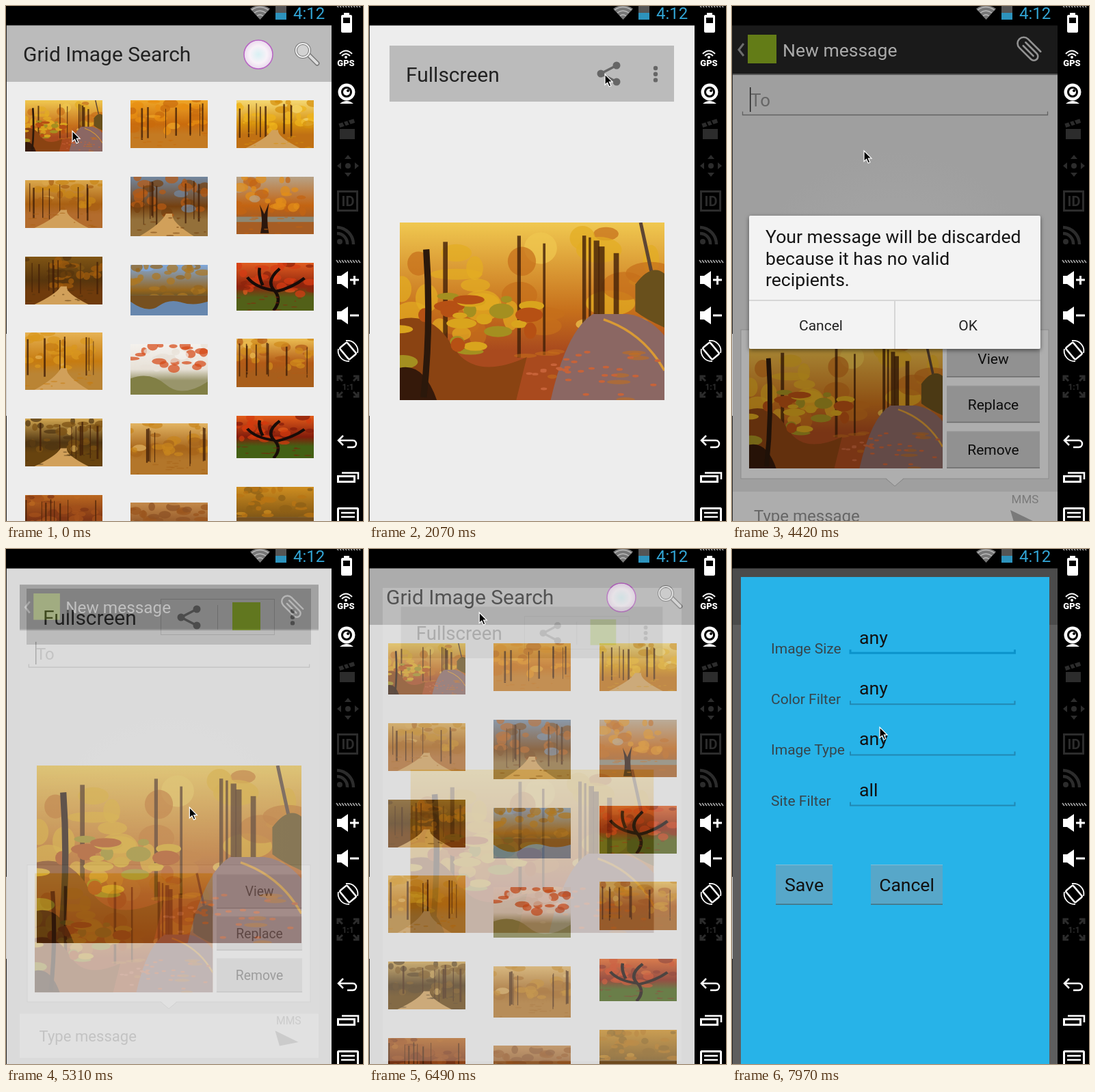
Recreate the animation shown at these times as an HTML page. Size 522 px wide and 754 px high, loop 8000 ms.

```html
<!DOCTYPE html>
<html lang="en">
<head>
<meta charset="utf-8">
<title>Grid Image Search</title>
<style>
html, body { margin: 0; width: 100%; height: 100%; overflow: hidden; background: #000; }
svg { display: block; }
#stage { width: 522px; height: 754px; font-family: Roboto, "Open Sans", sans-serif; }
</style>
</head>
<body>
<svg id="stage" viewBox="0 0 522 754"></svg>
<script>
const rect = (x, y, w, h, fill, extra = '') => `<rect x="${x}" y="${y}" width="${w}" height="${h}" fill="${fill}" ${extra}/>`;
const circle = (x, y, r, fill, extra = '') => `<circle cx="${x}" cy="${y}" r="${r}" fill="${fill}" ${extra}/>`;
const shape = (d, fill) => `<path d="${d}" fill="${fill}"/>`;
const line = (d, color, width = 2, extra = '') => `<path d="${d}" fill="none" stroke="${color}" stroke-width="${width}" ${extra}/>`;
const text = (x, y, size, fill, label, extra = '') => `<text x="${x}" y="${y}" font-size="${size}" fill="${fill}" ${extra}>${label}</text>`;
const middle = 'text-anchor="middle"';
const round = 'stroke-linecap="round" stroke-linejoin="round"';
const repeat = (n, make) => Array.from({ length: n }, (_, i) => make(i)).join('');

function random(seed) {
  return () => (seed = seed * 16807 % 2147483647) / 2147483647;
}

// Soft autumn scenery, painted in a 100 x 66 box.
let photoCount = 0;
const features = {
  road: () => shape('M73 34Q63 40 57 66H100V42Q94 35 86 34Z', '#8b6763') + line('M77 36Q92 41 100 55', '#d99a35', .9),
  path: () => shape('M46 41H54Q52 50 82 66H12Q40 52 46 41Z', '#d1a05a'),
  wood: () => '',
  lake: () => rect(0, 40, 100, 26, '#6787ae') + shape('M0 40H100V48Q82 54 66 49T36 54T0 48Z', '#765020'),
  tree: () => rect(0, 46, 100, 6, '#8d8875') + shape('M31 65Q35 50 30 32L36 43L42 30Q38 50 42 65Z', '#2b170d'),
  maple: () => line('M48 66Q60 50 48 37Q38 24 56 8M48 38Q24 34 14 20M50 40Q73 34 88 21M34 31Q28 18 30 7', '#180c08', 4),
  leaves: () => shape('M0 45Q25 35 46 53T100 49V66H0Z', '#817f45')
};

function photo(x, y, w, h, kind, sky, leafA, leafB, ground, seed) {
  const next = random(seed * 7919 + 11), id = 'tone' + photoCount++;
  const spread = kind === 'leaves' ? 34 : 43;
  const dabs = repeat(30, i => {
    const color = [leafA, leafB, i % 4 ? leafA : sky][i % 3];
    const cx = next() * 100, cy = next() * spread, rx = 3 + next() * 7, ry = 2 + next() * 4;
    return `<ellipse cx="${cx}" cy="${cy}" rx="${rx}" ry="${ry}" fill="${color}" opacity=".72"/>`;
  });
  const stems = 'road path wood'.includes(kind)
    ? repeat(8, () => rect(next() * 96, 4 + next() * 8, .7 + next() * 1.8, 38 + next() * 8, '#432008', 'opacity=".8"')) : '';
  const litter = kind === 'lake' || kind === 'leaves' ? '' : repeat(14, () =>
    `<ellipse cx="${next() * 100}" cy="${45 + next() * 21}" rx="${1 + next() * 4}" ry=".8" fill="${leafB}" opacity=".55"/>`);
  return `<svg x="${x}" y="${y}" width="${w}" height="${h}" viewBox="0 0 100 66" preserveAspectRatio="none">
    <linearGradient id="${id}" x2="0" y2="1"><stop stop-color="${sky}"/><stop offset=".5" stop-color="${leafB}"/>
    <stop offset=".72" stop-color="${ground}"/><stop offset="1" stop-color="${ground}"/></linearGradient>
    ${rect(0, 0, 100, 66, `url(#${id})`)}${dabs}${stems}${features[kind]()}${litter}</svg>`;
}

function roadPhoto(x, y, w, h) {
  const next = random(42);
  return photo(x, y, w, h, 'road', '#f0c850', '#e3ad22', '#c66f1b', '#a94a1e', 5).replace('</svg>',
    shape('M0 36Q12 33 20 46T48 50L44 66H0Z', '#8a4312') +
    repeat(24, i => `<ellipse cx="${next() * 50}" cy="${26 + next() * 26}" rx="${2 + next() * 4}" ry="${1 + next() * 2}" fill="${['#d9a41d', '#b65014', '#a48f20'][i % 3]}"/>`) +
    shape('M0 66V54Q9 52 14 66Z', '#35190a') +
    line('M10 10Q12 38 9 65', '#2b180b', 2.4) + line('M91 0L95 18', '#5d4533', 1.3) +
    shape('M89 23Q95 15 100 19V39Q93 36 89 33Z', '#69501c') +
    repeat(30, () => `<ellipse cx="${48 + next() * 50}" cy="${48 + next() * 17}" rx="1.2" ry=".5" fill="#c76339"/>`) + '</svg>');
}

const thumbs = [
  [1, 138, 70, 'wood', '#efa627', '#e88e10', '#c96b0d', '#c47a22'],
  [2, 138, 70, 'path', '#f5d873', '#efb41c', '#d6900e', '#c07013'],
  [0, 255, 70, 'path', '#dba84c', '#c78518', '#a96013', '#b36c2d'],
  [1, 250, 87, 'path', '#72879f', '#b75a13', '#75400f', '#94703a'],
  [2, 250, 84, 'tree', '#b7a287', '#e28d19', '#c36412', '#a65d24'],
  [0, 367, 70, 'path', '#805514', '#a15c0d', '#57350d', '#6f3b0c'],
  [1, 379, 74, 'lake', '#7fa8dc', '#ad7721', '#96651c', '#4c4930'],
  [2, 376, 70, 'maple', '#e05c20', '#d53b13', '#8d240d', '#526018'],
  [0, 478, 84, 'path', '#e6b253', '#d9971d', '#c67b10', '#ba8434'],
  [1, 495, 74, 'leaves', '#f4f1ed', '#d64a16', '#e7e1d7', '#99956b'],
  [2, 487, 71, 'wood', '#ebbd51', '#d08a1c', '#b35b17', '#a85e1b'],
  [0, 604, 70, 'path', '#d2a650', '#7c5014', '#4f3512', '#67430f'],
  [1, 611, 75, 'wood', '#e2b463', '#c7851d', '#a7651a', '#b3762a'],
  [2, 600, 62, 'maple', '#e35c1a', '#d23a0e', '#831c0b', '#436014'],
  [0, 716, 70, 'path', '#bb6820', '#a4511b', '#803615', '#552f1c'],
  [1, 727, 70, 'leaves', '#c3894a', '#9a541d', '#8c5124', '#5d3b27'],
  [2, 704, 74, 'lake', '#cf8e20', '#ba7514', '#8e5f16', '#704f19']
];

const share = (x, y) => line(`M${x + 12} ${y - 12}L${x - 11} ${y}L${x + 12} ${y + 12}`, '#666', 3.5) +
  circle(x - 11, y, 5.5, '#666') + circle(x + 12, y - 12, 5.5, '#666') + circle(x + 12, y + 12, 5.5, '#666');
const field = (x, y, w, color, width) => line(`M${x} ${y - 5}V${y}H${x + w}V${y - 5}`, color, width);

function button(x, y, w, h, label, size, fill, edge) {
  return rect(x, y, w, h, fill) + rect(x, y, w, 1, '#fff', 'opacity=".25"') + rect(x, y + h - 1.5, w, 1.5, edge) +
    text(x + w / 2, y + h / 2 + size * .36, size, '#111', label, middle);
}

const grid = rect(1, 28, 475, 753, '#ededed') + rect(1, 29, 475, 82, '#bbb') +
  text(25, 81, 30, '#222', 'Grid Image Search') +
  circle(369, 71, 21, 'url(#pearl)', 'stroke="#b863c4" stroke-width="1.5"') +
  line('M443 72L455 84', '#777', 7, round) + line('M443 72L455 84', '#ddd', 4, round) +
  circle(434, 65, 10, '#d2d2d2', 'stroke="#777" stroke-width="4"') + circle(434, 65, 10, 'none', 'stroke="#eee" stroke-width="2"') +
  roadPhoto(28, 138, 113, 75) +
  thumbs.map(([col, y, h, ...look], i) => photo([28, 182, 337][col], y, 113, h, ...look, i + 21)).join('');

const full = rect(1, 28, 475, 753, '#ededed') + rect(30, 58, 416, 82, '#bbb') + text(54, 111, 30, '#222', 'Fullscreen') +
  repeat(3, i => circle(419, 91 + i * 8.7, 3.2, '#666')) +
  `<g id="shareOnly">${share(350, 99)}</g>
  <g id="shareRecent">${rect(226.5, 73.5, 166, 52, 'none', 'stroke="#999"')}${rect(309, 82, 1, 36, '#999')}
  ${share(267, 100)}${rect(331, 78, 41, 41, '#87a91f')}</g>
  <g id="photo">${roadPhoto(45, 317, 387, 260)}</g>`;

const message = rect(1, 28, 475, 753, 'url(#glow)') + rect(1, 28, 475, 72, '#242424') + rect(1, 99, 475, 2, '#777') +
  line('M17 55L10 64L17 73', '#999', 3) + rect(23, 42, 42, 42, '#8bad20') +
  text(74, 74, 26.5, '#eee', 'New message') +
  line('M-13 -5H10A6 6 0 0 1 10 7H-14A9 9 0 0 1 -14 -11H12M-12 1H9', '#ccc', 2.6, 'transform="translate(435 66) rotate(45)" ' + round) +
  text(27, 147, 26, '#8f8f8f', 'To') + rect(26, 119, 1.5, 36, '#333') +
  `<g id="focused">${field(15.5, 159, 446, '#2698c6', 3)}</g><g id="blurred">${field(15.5, 159.5, 446, '#888', 1.3)}</g>` +
  rect(13, 474, 450, 218, '#f3f3f3', 'stroke="#c4c4c4"') + shape('M225 691H251L238 703Z', '#f3f3f3') +
  line('M225 692L238 703L251 692', '#bbb', 1) + roadPhoto(25, 487, 283, 190) +
  ['View', 'Replace', 'Remove'].map((label, i) => button(314, 489 + i * 66.7, 136, 54.5, label, 21, '#cbcbcb', '#999')).join('') +
  rect(1, 711, 475, 70, '#f2f2f2') + text(32, 755, 24, '#8f8f8f', 'Type message') +
  text(428.5, 728, 17, '#aaa', 'MMS', middle) + shape('M407 738L444 756L414 762Z', '#aaa');

const alertBox = rect(25, 307, 426, 195, '#f3f3f3', 'rx="2" filter="url(#shadow)"') +
  ['Your message will be discarded', 'because it has no valid', 'recipients.'].map((s, i) => text(49, 347 + i * 31.5, 26.6, '#151515', s)).join('') +
  rect(25, 430, 426, 2, '#d6d6d6') + rect(237, 431, 2, 71, '#d6d6d6') +
  text(130, 475, 21, '#222', 'Cancel', middle) + text(345, 475, 21, '#222', 'OK', middle);

const options = rect(13, 41, 451, 740, '#27b3e8') +
  [['Image Size', 'any'], ['Color Filter', 'any'], ['Image Type', 'any'], ['Site Filter', 'all']].map(([name, value], i) => {
    const y = 153 + i * 74.2;
    return text(57, y, 21, '#37454c', name) + text(186, y - 14, 26.7, '#111', value) +
      field(173, y - (i ? 0 : .8), 240.5, i ? '#2188b3' : '#0b93cb', i ? 2 : 3);
  }).join('') +
  button(64, 462, 83, 59, 'Save', 26.7, '#57a7c9', '#44717f') + button(203, 462, 105, 59, 'Cancel', 26.5, '#57a7c9', '#44717f');

const dimmed = '#2c2c2c', lit = '#fff';
const hatch = y => repeat(9, i => line(`M${483 + i * 4} ${y}l3 4`, '#aaa', 1.5));
const speaker = y => shape(`M484 ${y - 6}H490L500 ${y - 13}V${y + 13}L490 ${y + 6}H484Z`, lit) + rect(503, y - 1.5, 13, 3, lit);
const turned = (x, y, angle, body) => `<g transform="translate(${x} ${y}) rotate(${angle})">${body}</g>`;

const sidebar = rect(476, 0, 46, 754, '#000') + hatch(-2) + hatch(372) +
  rect(490, 13, 16, 26, lit, 'rx="2"') + rect(494, 10, 8, 4, lit) + rect(493, 17, 10, 8, '#000') +
  line('M488 70Q497 61 506 70M491 73Q497 67 503 73', lit, 2) + circle(497, 75, 2, lit) +
  text(497, 88, 13, lit, 'GPS', middle + ' font-weight="800"') +
  circle(498, 126, 12.5, lit) + circle(498, 126, 8, '#000') + circle(498, 126, 5, lit) + circle(500, 124, 2, '#000') + shape('M488 143Q498 135 508 143Z', lit) +
  rect(488, 180, 22, 15, dimmed) + turned(488, 177, -18, rect(0, -5, 23, 6, dimmed)) + line('M493 170l3 6M500 168l3 6', '#000', 2) +
  circle(500, 234, 4, dimmed) + repeat(4, i => turned(500, 234, i * 90, shape('M-5 -10L0 -16L5 -10Z', dimmed))) +
  rect(485.5, 271.5, 28, 28, 'none', `stroke="${dimmed}" stroke-width="3"`) + text(500, 293, 20, dimmed, 'ID', middle + ' font-weight="700"') +
  circle(488, 345, 4, dimmed) + line('M484 333A15 15 0 0 1 499 349M484 324A25 25 0 0 1 508 349', dimmed, 4.5) +
  speaker(401) + rect(508, 395, 3, 13, lit) + speaker(453) +
  turned(500, 505, -40, rect(-7, -11, 14, 22, 'none', `rx="2" stroke="${lit}" stroke-width="2.5"`)) +
  line('M497 490A15 15 0 0 1 514 508M502 520A15 15 0 0 1 486 502', lit, 1.8) +
  repeat(4, i => turned(500, 557, i * 90, line('M-15 -8V-15H-8M-15 -15L-8 -8', dimmed, 3))) + text(500, 562, 12, dimmed, '1:1', middle + ' font-weight="700"') +
  line('M493 629L486 636L493 643M487 636H507A5 5 0 0 1 507 646H499', lit, 2.5) +
  rect(485.5, 688.5, 24, 8, 'none', `stroke="${lit}" stroke-width="3"`) + line('M491 683.5H515V693', lit, 2.5) +
  rect(485.5, 735.5, 29, 24, 'none', `rx="1" stroke="${lit}" stroke-width="3"`) + line('M490 742H510M490 748H510', lit, 2.5);

const statusBar = rect(0, 0, 476, 28.5, '#000') + shape('M357 4Q371 -6 386 4L371.5 20Z', '#777') +
  line('M359 6Q371 -3 384 6M363 10Q371 4 380 10M367 14.5Q371 11 376 14.5', '#bbb', 1.3) +
  rect(394, 0, 16, 20, '#555') + rect(394, 10, 16, 10, '#2d93bd') + text(420, 19, 24, '#32a5d5', '4:12');

const layer = (id, body) => `<g id="${id}">${rect(1, 28, 475, 726, '#000', 'class="dim"')}<g class="window">${body}</g></g>`;

document.getElementById('stage').innerHTML = `
  <defs>
    <radialGradient id="pearl"><stop stop-color="#d8f0f3"/><stop offset=".6" stop-color="#f8f2f8"/><stop offset="1" stop-color="#ead9ed"/></radialGradient>
    <radialGradient id="glow" gradientUnits="userSpaceOnUse" cx="238" cy="430" r="240"><stop stop-color="#e8e8e8"/><stop offset="1" stop-color="#dedede"/></radialGradient>
    <filter id="shadow" x="-10%" y="-10%" width="120%" height="120%"><feDropShadow dx="0" dy="2" stdDeviation="3" flood-opacity=".5"/></filter>
    <clipPath id="screen">${rect(1, 28, 475, 726, '#000')}</clipPath>
  </defs>
  <g clip-path="url(#screen)">${grid}${layer('full', full)}${layer('message', message)}${layer('alertBox', alertBox)}${layer('options', options)}</g>
  ${rect(0, 28, 1, 726, '#222')}${rect(0, 480, 1, 120, '#ccc')}${statusBar}${sidebar}
  <path id="cursor" d="M0 0V15.5L3.6 12.2L6.2 18L8.8 16.8L6.3 11.2H11Z" fill="#000" stroke="#fff" stroke-width="1.2"/>`;

// Window states: [step, opacity, scale, dim behind], held until the next entry.
const windows = {
  full: { cy: 390, states: [[0, 0, 1, 0], [7, .59, .924, .17], [8, .93, .985, .3], [9, 1, 1, 0], [43, .6, .95, .15], [44, .25, .92, .08], [45, 0, 1, 0]] },
  message: { cy: 330, states: [[0, 0, 1, 0], [19, .35, .91, .2], [20, .82, .96, .42], [21, .98, .988, .66], [22, 1, 1, 0], [35, .7, .96, .15], [36, .3, .92, .08], [37, 0, 1, 0]] },
  alertBox: { cy: 404, states: [[0, 0, 1, 0], [30, 1, 1, .285], [31, 1, 1, .6], [34, .4, .98, .25], [35, 0, 1, 0]] },
  options: { cy: 404, states: [[0, 0, 1, 0], [51, .7, .97, .35], [52, 1, 1, .6], [55, 1, 1, .6]] }
};

// Pointer positions: [step, x, y]; the path is linear between them.
const pointer = [
  [0, 97, 183], [1, 97, 183], [3, 118, 187], [5, 112, 183], [8, 112, 183], [12, 345, 100], [14, 345, 100],
  [18, 303, 316], [23, 303, 316], [28, 193, 212], [30, 193, 212], [33, 345, 465], [34, 345, 465],
  [37, 230, 335], [40, 97, 177], [41, 108, 98], [43, 112, 98], [48, 358, 73], [49, 362, 70], [51, 362, 70],
  [52, 299, 111], [53, 299, 111], [54, 216, 261], [55, 216, 261]
];

const get = id => document.getElementById(id);
const show = (id, on) => get(id).setAttribute('visibility', on ? 'inherit' : 'hidden');

function pointerAt(step) {
  const i = pointer.findIndex(p => p[0] > step);
  const [s0, x0, y0] = pointer[i - 1], [s1, x1, y1] = pointer[i];
  const k = (step - s0) / (s1 - s0);
  return [x0 + (x1 - x0) * k, y0 + (y1 - y0) * k];
}

function draw(step) {
  for (const [id, { cy, states }] of Object.entries(windows)) {
    const [, alpha, scale, dim] = states.filter(s => s[0] <= step).pop();
    const group = get(id), pane = group.querySelector('.window');
    group.style.display = alpha ? '' : 'none';
    group.querySelector('.dim').setAttribute('opacity', dim);
    pane.setAttribute('opacity', alpha);
    pane.setAttribute('transform', `translate(238.5 ${cy}) scale(${scale}) translate(-238.5 ${-cy})`);
  }
  show('photo', step >= 10);
  show('shareOnly', step < 30);
  show('shareRecent', step >= 30);
  show('focused', step < 30);
  show('blurred', step >= 30);
  get('cursor').setAttribute('transform', `translate(${pointerAt(step)})`);
}

const loop = 8000, stepTime = 147.8, lead = 30;
const start = performance.now();
let shown = -1;
function tick() {
  const time = (performance.now() - start) % loop;
  const step = Math.floor((time + lead) / stepTime);
  if (step !== shown) draw(shown = step);
  requestAnimationFrame(tick);
}
tick();
</script>
</body>
</html>
```
